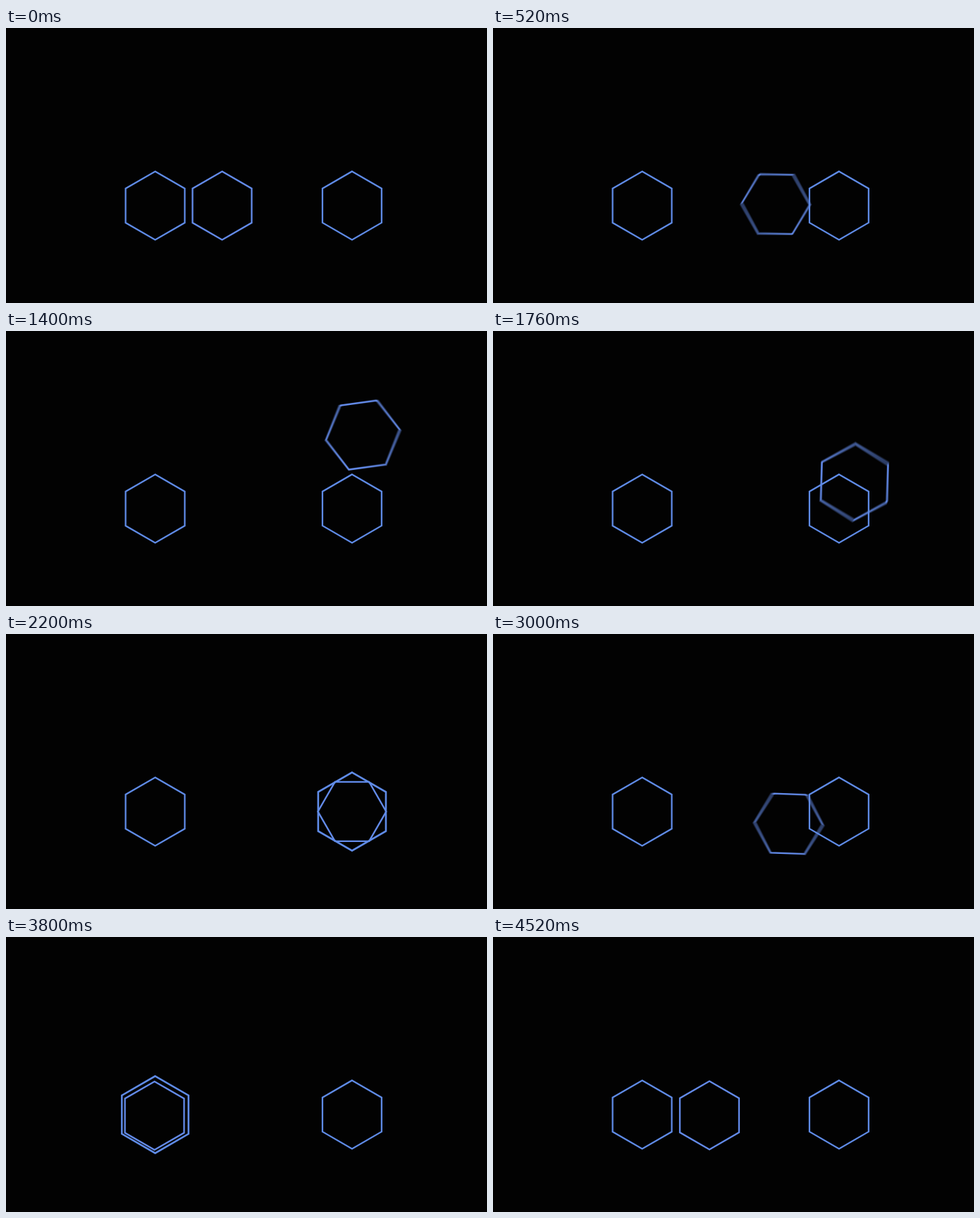
Recreate the animation shown at these times as an HTML page with a canvas. Size 690 px wide and 394 px high, loop 4.64 s.

```html
<!DOCTYPE html>
<html lang="en">
<head>
<meta charset="utf-8">
<title>Hexagons</title>
<style>
  html, body { margin: 0; height: 100%; overflow: hidden; background: #020202; }
  canvas { display: block; }
</style>
</head>
<body>
<canvas id="stage" width="690" height="394"></canvas>
<script>
const ctx = document.getElementById('stage').getContext('2d');
const LOOP = 4640, LAST = 4520, STEP = 40;
const RADIUS = 49, LINE = 2.3, SHUTTER = 20, SAMPLES = 8;

const home = [310, 254.5], left = [214, 254.5], right = [496.4, 254.4];
const perch = [452.5, 175], pause = [394, 257], landing = [213, 256];

// Each leg eases along a Bezier path while the hexagon rolls on to an angle
const legs = [
  { end: 1040, path: [home, [430, 290], perch], angle: 62 },
  { end: 2200, path: [perch, [580, 85], [509.6, 255.8], right], angle: 150, swell: 0.14 },
  { end: 2520, path: [right], angle: 180 },
  { end: 2680, path: [right], angle: 180 },
  { end: 3240, path: [right, [424, 289], pause], angle: 134 },
  { end: 3800, path: [pause, [303, 250], landing], angle: 60 },
  { end: LAST, path: [landing, [250, 265], [310.5, 255.5]], angle: 120 }
];

const clamp = u => Math.min(1, Math.max(0, u));
const ease = u => u * u * (3 - 2 * u);
const mix = (a, b, u) => a + (b - a) * u;

function bezier(points, u) {
  if (points.length === 1) return points[0];
  const inner = points.slice(1).map((p, i) => p.map((c, k) => mix(points[i][k], c, u)));
  return bezier(inner, u);
}

// One smooth swelling between two times
function pulse(t, from, to, amount) {
  return 1 + amount * Math.sin(Math.PI * clamp((t - from) / (to - from))) ** 2;
}

function hexagon([x, y], scale, degrees = 0) {
  ctx.lineWidth = LINE * scale;
  ctx.beginPath();
  for (let i = 0; i < 6; i++) {
    const a = (degrees + i * 60 - 90) * Math.PI / 180;
    ctx.lineTo(x + RADIUS * scale * Math.cos(a), y + RADIUS * scale * Math.sin(a));
  }
  ctx.closePath();
  ctx.stroke();
}

function traveller(t) {
  const i = legs.findIndex(leg => t <= leg.end);
  const leg = legs[i], before = legs[i - 1] || { end: 0, angle: 0 };
  const u = ease(clamp((t - before.end) / (leg.end - before.end)));
  const scale = 1 + (leg.swell || 0) * Math.sin(Math.PI * u);
  hexagon(bezier(leg.path, u), scale, mix(before.angle, leg.angle, u));
}

// Adds up faint copies across the shutter time
function blurredTraveller(t) {
  ctx.globalCompositeOperation = 'lighter';
  ctx.globalAlpha = 1 / SAMPLES;
  for (let i = 0; i < SAMPLES; i++) {
    const offset = ((i + 0.5) / SAMPLES - 0.5) * SHUTTER;
    traveller(Math.min(LAST, Math.max(0, t + offset)));
  }
  ctx.globalCompositeOperation = 'source-over';
  ctx.globalAlpha = 1;
}

function draw(now) {
  const t = Math.min(LAST, Math.floor(now % LOOP / STEP) * STEP);
  ctx.fillStyle = '#020202';
  ctx.fillRect(0, 0, 690, 394);
  ctx.strokeStyle = '#5f8be6';
  blurredTraveller(t);
  hexagon(left, pulse(t, 3160, 4080, 0.19));
  hexagon(right, pulse(t, 1760, 2480, 0.164));
}

const start = performance.now();
function tick() {
  draw(performance.now() - start);
  requestAnimationFrame(tick);
}
tick();
</script>
</body>
</html>
```
